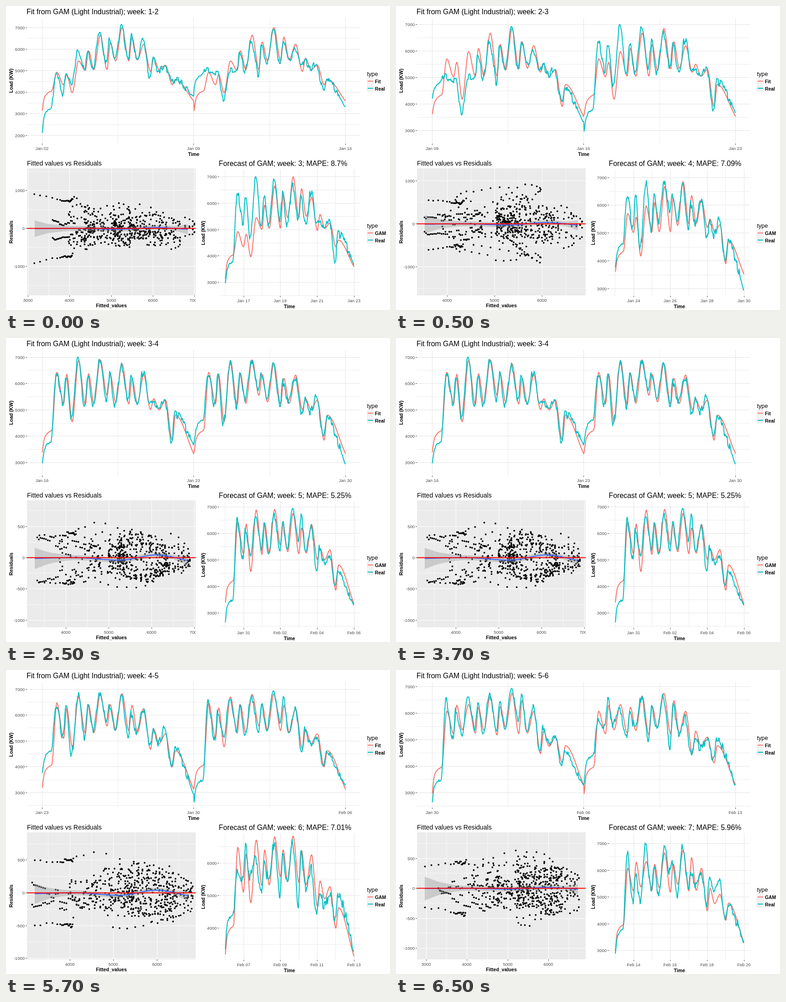
These frames come from a looping animation (842x665 px, 8 s). An HTML page with a canvas:

```html
<!DOCTYPE html>
<html lang="en">
<head>
<meta charset="utf-8">
<title>Load fit and forecast</title>
<style>
html, body { margin: 0; width: 100%; height: 100%; overflow: hidden; background: #fff; }
canvas { display: block; width: 842px; height: 665px; }
</style>
</head>
<body>
<canvas id="stage" width="842" height="665"></canvas>
<script>
const ctx = document.getElementById('stage').getContext('2d');
const SANS = '"Liberation Sans", Arial, sans-serif';
const RED = '#F8766D', TEAL = '#00BFC4', LABEL = '#4D4D4D';
const WEEK = 333, LOOP = 8000;
const TOP = { x: 46, y: 26, w: 731, h: 275 };
const DOTS = { x: 46, y: 355, w: 370, h: 278, grey: true };
const NEXT = { x: 467, y: 357, w: 309, h: 277 };

// Load / 10 per week: start, first plateau, alternating peaks and troughs, end
const jan02 = [210, 318, 490, 390, 480, 430, 590, 512, 595, 515, 685, 530, 645, 550, 705, 560, 670, 550, 645, 475, 560, 505, 520, 460, 462, 383];
const jan09 = [420, 480, 495, 480, 485, 365, 500, 490, 590, 495, 645, 480, 620, 540, 695, 530, 640, 550, 600, 518, 555, 505, 530, 410, 458, 335];
const jan16 = [302, 375, 645, 525, 630, 470, 695, 520, 630, 515, 690, 530, 630, 515, 675, 535, 630, 520, 640, 522, 545, 505, 530, 370, 490, 370];
const jan23 = [375, 455, 640, 520, 640, 440, 680, 520, 645, 535, 690, 580, 640, 545, 675, 510, 610, 530, 625, 480, 540, 495, 545, 400, 470, 297];
const jan30 = [264, 345, 655, 500, 615, 515, 660, 540, 635, 530, 670, 535, 640, 540, 690, 570, 665, 535, 625, 455, 550, 485, 510, 400, 455, 330];
const feb06 = [330, 435, 560, 545, 645, 560, 605, 510, 610, 540, 660, 500, 610, 555, 660, 475, 630, 515, 590, 440, 515, 465, 510, 425, 500, 330];
const feb13 = [285, 373, 665, 480, 585, 475, 690, 515, 615, 510, 690, 590, 625, 505, 690, 535, 595, 535, 590, 475, 565, 520, 555, 415, 470, 330];
const weeks = [jan02, jan09, jan16, jan23, jan30, feb06, feb13];

// Offsets of those values within the week; swings come every half day
const swing = j => 32 + 11.95 * j + [0, 3, -2, -2][j % 4];
const KNOTS = [0, 5, 14, 21, ...Array.from({ length: 23 }, (_, j) => swing(j)), WEEK];

// top, next: pixel of 7000 and pixels per 1000; fitted: pixel of 5000 and pixels per 1000;
// rest: pixel of zero, pixels per step, step
const scenes = [
  { mape: '8.7', top: [47, 47.2], next: [373.5, 57.8], fitted: [231, 91.3], rest: [486.5, 83, 1000], bend: 2, band: 18 },
  { mape: '7.09', top: [40.5, 57.9], next: [375, 60.9], fitted: [216, 104], rest: [476.5, 94.2, 1000], bend: 3, band: 20 },
  { mape: '5.25', top: [42, 57.6], next: [369, 58], fitted: [225, 94], rest: [480.5, 68.4, 500], bend: 6, band: 23 },
  { mape: '7.01', top: [42, 56.6], next: [350.7, 71.3], fitted: [235.5, 95.5], rest: [487.5, 71.6, 500], bend: 6, band: 22 },
  { mape: '5.96', top: [36.5, 58], next: [379.5, 58.5], fitted: [245, 89.4], rest: [477.5, 65.5, 500], bend: 2, band: 26 }
];

// Monotone cubic through the given points
function smooth(xs, ys) {
  const n = xs.length, rise = i => (ys[i + 1] - ys[i]) / (xs[i + 1] - xs[i]);
  const slope = xs.map((_, i) => {
    if (i === 0) return rise(0);
    if (i === n - 1) return rise(n - 2);
    const a = rise(i - 1), b = rise(i);
    return a * b > 0 ? 2 * a * b / (a + b) : 0;
  });
  return x => {
    let i = 0;
    while (i < n - 2 && x > xs[i + 1]) i++;
    const h = xs[i + 1] - xs[i], u = (x - xs[i]) / h, v = 1 - u;
    return v * v * ((1 + 2 * u) * ys[i] + u * h * slope[i]) +
           u * u * ((1 + 2 * v) * ys[i + 1] - v * h * slope[i + 1]);
  };
}

function noise(k) {
  const s = Math.sin(k * 12.9898) * 43758.5453;
  return (s - Math.floor(s)) * 2 - 1;
}

function weekCurve([start, flat, ...rest]) {
  return smooth(KNOTS, [start, flat - 22, flat, flat + 8, ...rest]);
}

const samples = f => Array.from({ length: WEEK + 1 }, (_, t) => f(t));

function measured(n) {
  const f = weekCurve(weeks[n]);
  return samples(t => {
    const rough = t < 22 || t > 325 ? .3 : 1;
    const jitter = 120 * noise(n * 500 + (t >> 2) + 1) + 90 * noise(n * 900 + (t >> 1) + 7);
    return f(t < 20 ? t : Math.min(WEEK, t + 1.5)) * 10 + rough * jitter;
  });
}

// The weekly model settles on the mean of its two training weeks
function modelled(n) {
  const f = weekCurve(weeks[n].map((v, i) => (v + weeks[n + 1][i]) / 2));
  return samples(t => f(t) * 10);
}

function text(s, x, y, size, { align = 'left', bold = false, color = '#000' } = {}) {
  ctx.font = `${bold ? 'bold ' : ''}${size}px ${SANS}`;
  ctx.textAlign = align;
  ctx.fillStyle = color;
  ctx.fillText(s, x, y);
}

const axisTitle = (s, x, y) => text(s, x, y, 10.6, { align: 'center', bold: true });

function sideTitle(s, x, y) {
  ctx.save();
  ctx.translate(x, y);
  ctx.rotate(-Math.PI / 2);
  axisTitle(s, 0, 0);
  ctx.restore();
}

function eachLine(box, upright, at, gap, draw) {
  const lo = upright ? box.x : box.y, hi = lo + (upright ? box.w : box.h);
  for (let k = -9; k <= 9; k++) {
    const p = at + k * gap;
    if (p >= lo && p < hi) draw(Math.floor(p), k);
  }
}

function axes(box, xAxis, yAxis) {
  if (box.grey) {
    ctx.fillStyle = '#EBEBEB';
    ctx.fillRect(box.x, box.y, box.w, box.h);
  }
  const rule = (upright, color) => p => {
    ctx.fillStyle = color;
    if (upright) ctx.fillRect(p, box.y, 1, box.h);
    else ctx.fillRect(box.x, p, box.w, 1);
  };
  const minor = box.grey ? '#F7F7F7' : '#EBEBEB', major = box.grey ? '#FFF' : '#E3E3E3';
  for (const [shift, color] of [[.5, minor], [0, major]]) {
    eachLine(box, true, xAxis.at + shift * xAxis.gap, xAxis.gap, rule(true, color));
    eachLine(box, false, yAxis.at + shift * yAxis.gap, yAxis.gap, rule(false, color));
  }
  const foot = box.y + box.h;
  ctx.save();
  if (box.grey) {
    ctx.beginPath();
    ctx.rect(0, 0, 416, 665);
    ctx.clip();
  }
  eachLine(box, true, xAxis.at, xAxis.gap, (p, k) => {
    text(xAxis.label(k), p, foot + 13.5, 9.5, { align: 'center', color: LABEL });
    ctx.fillRect(p, foot, 1, 3);
  });
  eachLine(box, false, yAxis.at, yAxis.gap, (p, k) => {
    text(yAxis.label(k), box.x - 5, p + 4, 9.5, { align: 'right', color: LABEL });
    ctx.fillRect(box.x - 3, p, 3, 1);
  });
  ctx.restore();
}

function line(points, color) {
  ctx.beginPath();
  points.forEach(([x, y]) => ctx.lineTo(x, y));
  ctx.strokeStyle = color;
  ctx.lineWidth = 2;
  ctx.lineJoin = 'round';
  ctx.stroke();
}

function legend(y, names) {
  text('type', 791.5, y, 12.7);
  names.forEach((name, i) => {
    const mid = y + 11.5 + i * 15.5;
    ctx.fillStyle = '#F2F2F2';
    ctx.fillRect(791, mid - 7.5, 15, 15);
    line([[793, mid], [805, mid]], i ? TEAL : RED);
    text(name, 809, mid + 4.5, 10.4, { bold: true });
  });
}

function date(day) {
  const inJan = day <= 31;
  return (inJan ? 'Jan ' : 'Feb ') + String(inJan ? day : day - 31).padStart(2, '0');
}

const loadAxis = ([at, gap]) => ({ at, gap, label: k => 7000 - k * 1000 });

function loadLines(series, x0, dx, [at, gap]) {
  series.forEach((values, i) =>
    line(values.map((v, t) => [x0 + t * dx, at + (7000 - v) * gap / 1000]), i ? TEAL : RED));
}

function residuals({ fitted: [x5, xGap], rest: [zero, yGap, step], bend, band }, fit, real) {
  axes(DOTS,
    { at: x5, gap: xGap, label: k => 5000 + k * 1000 },
    { at: zero, gap: yGap, label: k => -k * step });
  ctx.fillStyle = '#000';
  fit.forEach((v, i) => {
    const d = (v - real[i]) * yGap / step, room = d < 0 ? zero - 365 : 622 - zero;
    ctx.beginPath();
    ctx.arc(x5 + (v - 5000) * xGap / 1000, zero + room * Math.tanh(d / room), 1.9, 0, 7);
    ctx.fill();
  });
  const trend = smooth([63, 150, 250, 330, 399], [.3, 0, .9, -1, 1]);
  const half = smooth([63, 100, 150, 365, 399], [band, band / 2, 5.5, 5, 11]);
  const mid = [], upper = [], lower = [];
  for (let x = 63; x <= 399; x += 3) {
    const y = zero + bend * trend(x);
    mid.push([x, y]);
    upper.push([x, y - half(x)]);
    lower.unshift([x, y + half(x)]);
  }
  ctx.beginPath();
  upper.concat(lower).forEach(([x, y]) => ctx.lineTo(x, y));
  ctx.fillStyle = 'rgba(153,153,153,.4)';
  ctx.fill();
  line(mid, '#3366FF');
  line([[46, zero], [416, zero]], '#FF0000');
}

function draw(n) {
  const s = scenes[n], fit = modelled(n), twice = fit.concat(fit);
  const real = measured(n).concat(measured(n + 1));
  ctx.fillStyle = '#fff';
  ctx.fillRect(0, 0, 842, 665);

  text(`Fit from GAM (Light Industrial); week: ${n + 1}-${n + 2}`, 45, 18, 15.85);
  axes(TOP, { at: 79, gap: 332.7, label: k => date(2 + 7 * (n + k)) }, loadAxis(s.top));
  loadLines([twice, real], 79.5, 665 / 667, s.top);
  axisTitle('Time', 411.5, 328);
  sideTitle('Load (KW)', 14.5, 163.5);
  legend(153, ['Fit', 'Real']);

  text('Fitted values vs Residuals', 46, 349, 14.1);
  residuals(s, twice, real);
  axisTitle('Fitted_values', 231, 659);
  sideTitle('Residuals', 14.5, 494.5);

  text(`Forecast of GAM; week: ${n + 3}; MAPE: ${s.mape}%`, 466.5, 350, 15.85);
  axes(NEXT, { at: 521, gap: 80.7, label: k => date(17 + 7 * n + 2 * k) }, loadAxis(s.next));
  loadLines([fit, measured(n + 2)], 481, 282 / WEEK, s.next);
  axisTitle('Time', 621.5, 661);
  sideTitle('Load (KW)', 435.5, 496.5);
  legend(485, ['GAM', 'Real']);
}

let shown = -1;
function tick() {
  const t = performance.now() % LOOP;
  const n = Math.floor((t + 1500) / 2000);
  if (n !== shown) draw(shown = n);
  requestAnimationFrame(tick);
}
tick();
</script>
</body>
</html>
```
